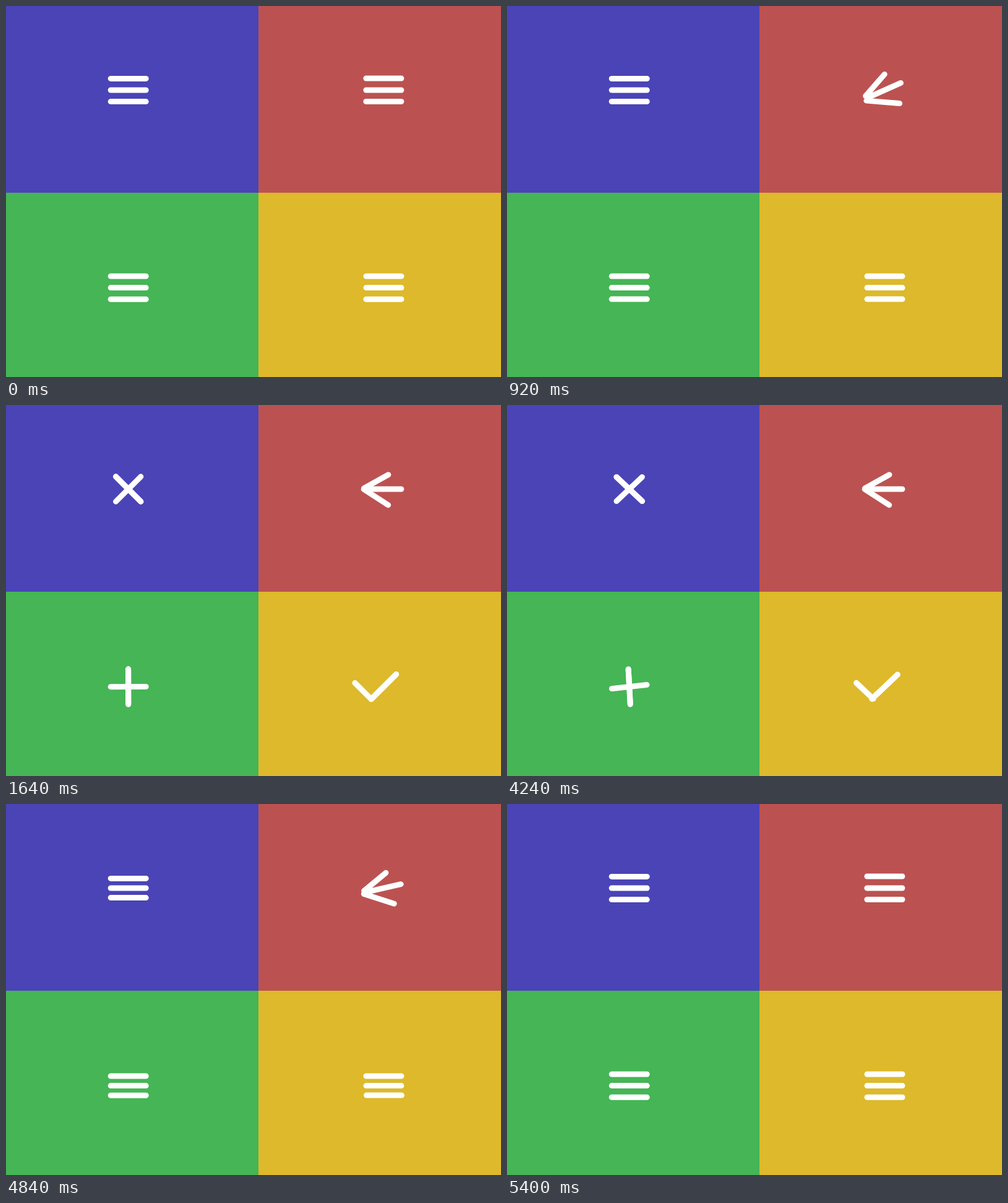
Recreate the animation shown at these times as an HTML page. Size 800 px wide and 600 px high, loop 5520 ms.

```html
<!DOCTYPE html>
<html lang="en">
<head>
<meta charset="utf-8">
<title>Menu icons</title>
<style>
  html, body { margin: 0; width: 100%; height: 100%; overflow: hidden; }
  svg { display: block; width: 100%; height: 100%; }
  line { stroke: #fff; stroke-width: 9; stroke-linecap: round; }
</style>
</head>
<body>
<svg id="stage" viewBox="0 0 800 600">
  <rect width="408" height="302" fill="#4a44b7"/>
  <rect x="408" width="392" height="302" fill="#bb5251"/>
  <rect y="302" width="408" height="298" fill="#45b555"/>
  <rect x="408" y="302" width="392" height="298" fill="#ddb92b"/>
</svg>
<script>
const LOOP = 5520, TURN = 5840, STEP = 40;
const HALF = 28.5, GAP = 18.6;
const stage = document.getElementById('stage');

const mix = (a, b, k) => a + (b - a) * k;
const rad = deg => deg * Math.PI / 180;

// CSS-style cubic-bezier timing function
function bezier(x1, y1, x2, y2) {
  const at = (a, b, s) => 3 * a * s * (1 - s) ** 2 + 3 * b * s * s * (1 - s) + s ** 3;
  return x => {
    if (x <= 0) return 0;
    if (x >= 1) return 1;
    let lo = 0, hi = 1;
    for (let i = 0; i < 30; i++) {
      const mid = (lo + hi) / 2;
      if (at(x1, x2, mid) < x) lo = mid; else hi = mid;
    }
    return at(y1, y2, lo);
  };
}
const ease = bezier(.25, .1, .25, 1);
const easeInOut = bezier(.42, 0, .58, 1);

function icon(cx, cy) {
  const bars = [0, 1, 2].map(() =>
    stage.appendChild(document.createElementNS('http://www.w3.org/2000/svg', 'line')));
  return (i, x, y, deg, half = HALF) => {
    const dx = half * Math.cos(rad(deg)), dy = half * Math.sin(rad(deg));
    const ends = { x1: cx + x - dx, y1: cy + y - dy, x2: cx + x + dx, y2: cy + y + dy };
    for (const key in ends) bars[i].setAttribute(key, ends[key].toFixed(2));
  };
}
const cross = icon(197.7, 136);
const arrow = icon(610.4, 136);
const plus = icon(197.7, 455.6);
const check = icon(610.5, 455.6);

// Places a bar whose offset turns with it
function orbit(i, x, y, deg, half) {
  const c = Math.cos(rad(deg)), s = Math.sin(rad(deg));
  arrow(i, x * c - y * s, x * s + y * c, deg, half);
}

function drawArrow(p) {
  const late = p ** 8;
  orbit(0, mix(0, 3.4, late), mix(-19, -17.7, late) - 8 * p * (1 - p), 213 * p, mix(HALF, 23.5, late));
  orbit(1, 0, 0, 180 * p);
  orbit(2, 4.7 * p, mix(18.5, 16.7, p), 151 * p, mix(HALF, 22.5, p));
}

function drawPair(draw, gap, first, second) {
  draw(0, 0, -gap, first);
  draw(1, 0, 0, first);
  draw(2, 0, gap, second);
}

function drawCheck(gap, merge, turn) {
  check(0, 0, -gap, -45 * turn);
  check(1, 0, 0, -45 * turn);
  check(2, mix(3 * merge, -33.5, turn), mix(mix(GAP, -1, merge), 7, turn),
    45 * turn, mix(HALF, 18.5, turn));
}

function render(time) {
  let t = Math.floor(time % LOOP / STEP) * STEP;
  if (t > TURN / 2) t = TURN - t;   // the second half plays backwards
  const merge = easeInOut((t - 900) / 360);
  const turn = easeInOut((t - 1270) / 380);
  const gap = GAP * (1 - merge);
  drawArrow(ease((t - 460) / 800));
  drawPair(cross, gap, 45 * turn, -45 * turn);
  drawPair(plus, gap, 90 * turn, 180 * turn);
  drawCheck(gap, merge, turn);
}

const start = performance.now();
function tick() {
  render(performance.now() - start);
  requestAnimationFrame(tick);
}
tick();
</script>
</body>
</html>
```
